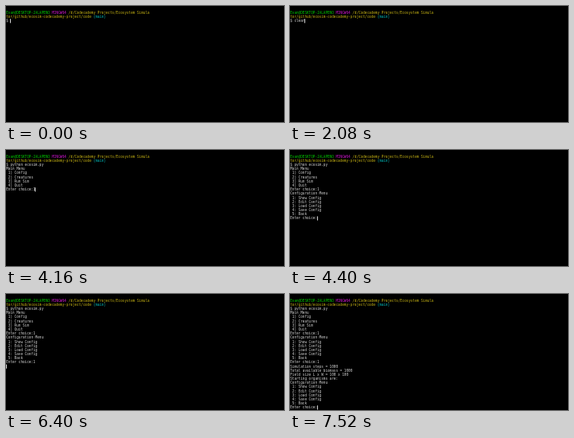
These frames come from a looping animation (348 by 146 pixels, 8 s). An HTML page with a canvas:

```html
<!DOCTYPE html>
<html lang="en">
<head>
<meta charset="utf-8">
<title>Terminal session</title>
<style>
html, body { margin: 0; width: 100%; height: 100%; overflow: hidden; background: #000; }
canvas { display: block; width: 348px; height: 146px; }
</style>
</head>
<body>
<canvas id="stage"></canvas>
<script>
const W = 348, H = 146, LOOP = 8000;
const CELL = 2.6, PITCH = 5.17, TOP = 5.9, BASE = 3.9;
const WHITE = '#d6d6d6', GREEN = '#00c800', PURPLE = '#c814c8', YELLOW = '#c8b414', CYAN = '#00bebe';

const canvas = document.getElementById('stage');
const ctx = canvas.getContext('2d');
const dpr = window.devicePixelRatio || 1;
canvas.width = W * dpr;
canvas.height = H * dpr;

const mainMenu = ['Main Menu', ' 1) Config', ' 2) Creatures', ' 3) Run Sim', ' 4) Quit'];
const configMenu = ['Configuration Menu', ' 1: Show Config', ' 2: Edit Config',
  ' 3: Load Config', ' 4: Save Config', ' 5: Back'];
const report = ['Simulation steps = 1000', 'Total available biomass = 1000',
  'Field size L x W = 100 x 100', 'Starting organisms are:'];
const ask = 'Enter choice:';

const run = ['$ python ecosim.py'];
const first = [...run, ...mainMenu, ask];
const firstDone = [...run, ...mainMenu, ask + '1'];
const second = [...firstDone, ...configMenu, ask];
const secondDone = [...firstDone, ...configMenu, ask + '1'];
const third = [...secondDone, ...report, ...configMenu, ask];

// [start time, screen lines, times at which the cursor toggles]
const steps = [
  [0, ['$ '], [560, 1120]],
  [1440, ['$ clear'], [1440, 1520, 2000, 2080]],
  [2160, run, []],
  [2640, [...run, ''], []],
  [2720, first, [3200, 3760]],
  [4160, firstDone, []],
  [4400, second, [4960, 5440, 6000]],
  [6240, secondDone, []],
  [6400, [...secondDone, ''], []],
  [6480, third, [6960, 7520]]
];

function write(text, col, row, color) {
  // Large glyphs scaled down keep the advance widths exact.
  const k = 0.05;
  ctx.save();
  ctx.translate(col * CELL + 0.2, TOP + BASE + row * PITCH);
  ctx.scale(k, k);
  ctx.font = `${CELL / 0.602 / k}px "DejaVu Sans Mono", monospace`;
  ctx.fillStyle = color;
  ctx.fillText(text, 0, 0);
  ctx.restore();
}

function prompt() {
  write('Evan@DESKTOP-JALAPENO', 0, 0, GREEN);
  write('MINGW64', 22, 0, PURPLE);
  write('/d/Codecademy Projects/Ecosystem Simula', 30, 0, YELLOW);
  write('tor/github/ecosim-codecademy-project/code', 0, 1, YELLOW);
  write('(main)', 42, 1, CYAN);
}

function draw(t) {
  ctx.setTransform(dpr, 0, 0, dpr, 0, 0);
  ctx.fillStyle = '#000';
  ctx.fillRect(0, 0, W, H);
  prompt();

  const [, lines, blinks] = steps.filter(s => s[0] <= t).pop();
  lines.forEach((line, i) => write(line, 0, i + 2, WHITE));

  const toggles = blinks.filter(b => b <= t).length;
  if (toggles % 2 === 0) {
    const row = lines.length + 1;
    const col = lines[lines.length - 1].length;
    ctx.fillStyle = WHITE;
    ctx.fillRect(Math.floor(col * CELL + 0.3), TOP + row * PITCH, 1, PITCH);
  }
}

const start = performance.now();
function tick() {
  draw((performance.now() - start) % LOOP);
  requestAnimationFrame(tick);
}
tick();
</script>
</body>
</html>
```
